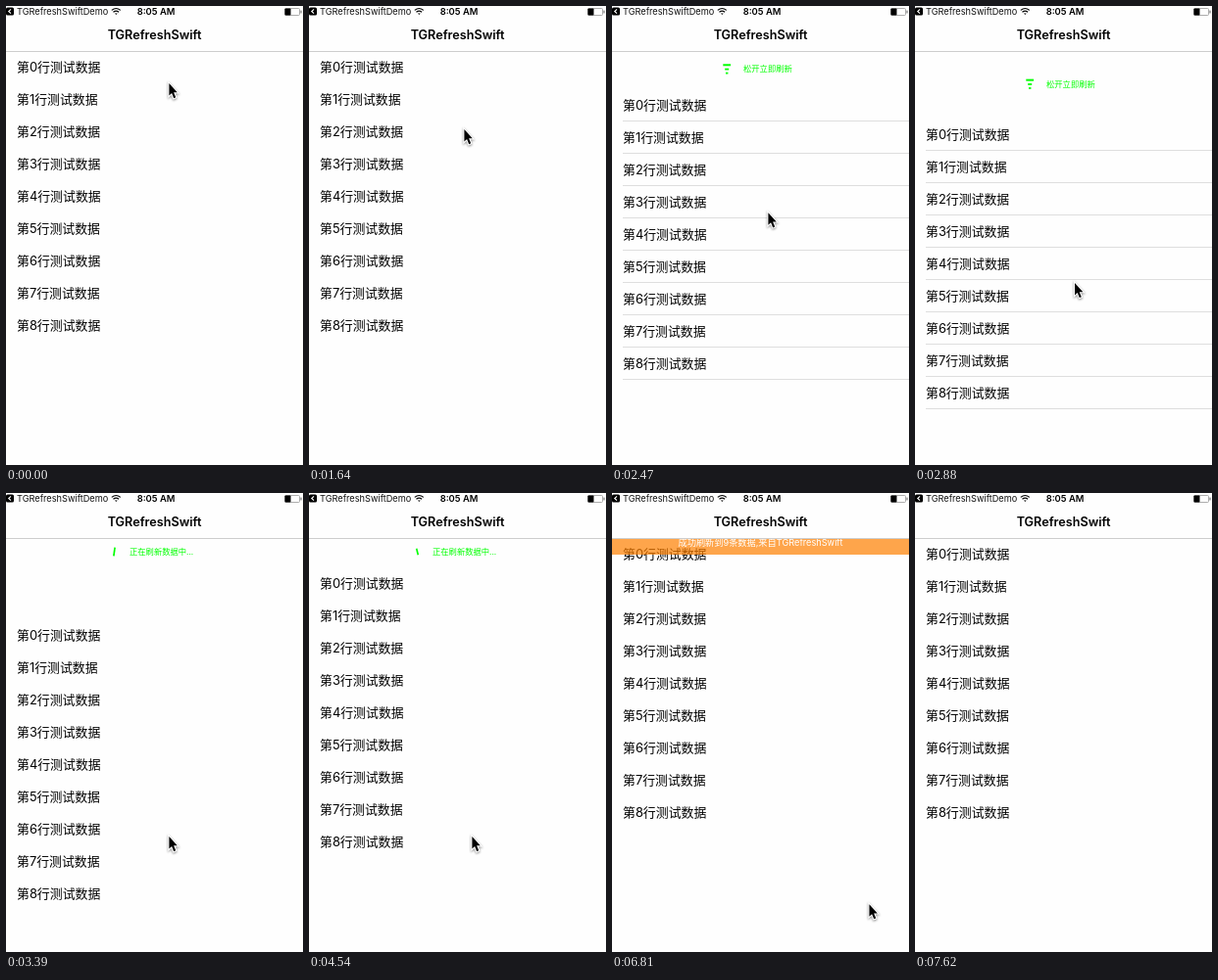
Animation, 303 px wide and 469 px high, one loop 8730 ms. Source, as an HTML page:

```html
<!DOCTYPE html>
<html>
<head>
<meta charset="utf-8">
<title>Pull to refresh</title>
<style>
html, body { margin: 0; width: 100%; height: 100%; overflow: hidden; background: #fefefe; }
svg { display: block; width: 303px; height: 469px; }
text { font-family: Inter, "Noto Sans CJK SC", "Noto Sans CJK", sans-serif; white-space: pre; }
.row { font-size: 12.9px; fill: #000; }
.tip { font-size: 8.3px; fill: #0f0; }
</style>
</head>
<body>
<svg viewBox="0 0 303 469">
  <rect width="303" height="469" fill="#fefefe"/>
  <g id="list"></g>
  <g id="head">
    <g id="funnel" fill="#0f0">
      <rect x="113.3" y="-5" width="7.8" height="2"/>
      <rect x="115.2" y="-.6" width="4" height="1.8"/>
      <rect x="116" y="3.4" width="2.4" height="1.8"/>
    </g>
    <path id="spin" d="M0-4.4V4.4" stroke="#0f0" stroke-width="1.7"/>
    <text id="tip" class="tip" y="3"></text>
  </g>
  <g id="banner">
    <rect width="303" height="26" fill="#ff8000" opacity=".7"/>
    <text x="151.5" y="16.8" text-anchor="middle" font-size="9.2" fill="#fff">成功刷新到9条数据,来自TGRefreshSwift</text>
  </g>
  <rect width="303" height="46" fill="#fefefe"/>
  <rect y="46" width="303" height="1" fill="#cdcdcd"/>
  <rect y="1.5" width="8" height="8" rx="1.6"/>
  <path d="M5 3.3L2.7 5.5L5 7.7" fill="none" stroke="#fff" stroke-width="1.1"/>
  <text x="11" y="8.6" font-size="9.2" fill="#111">TGRefreshSwiftDemo</text>
  <g fill="none" stroke="#000" stroke-width="1.2">
    <path d="M107.8 4.4Q112.3 .6 116.8 4.4M109.5 6.3Q112.3 4 115.1 6.3"/>
    <path d="M111 7.4H113.6L112.3 8.9Z" fill="#000" stroke="none"/>
  </g>
  <text x="153" y="9" font-size="9.4" font-weight="600" text-anchor="middle">8:05 AM</text>
  <rect x="284.5" y="2.5" width="15" height="7" rx="1" fill="none" stroke="#999" stroke-width=".8"/>
  <rect x="284.5" y="2.5" width="6" height="7" rx=".8"/>
  <rect x="300.4" y="4.6" width="1.2" height="2.8" fill="#777"/>
  <text x="151.6" y="34" font-size="12.65" font-weight="600" text-anchor="middle">TGRefreshSwift</text>
  <path id="cursor" d="M.4 0V12.6L3.1 10L5.2 15.2L7.2 14.3L5.1 9.3H8.8Z" stroke="#fff" stroke-width="2.2"
    paint-order="stroke" style="filter:drop-shadow(0 1px .8px rgba(0,0,0,.45))"/>
</svg>
<script>
const LOOP = 8730, START = 1660, RELEASE = 3270, DONE = 5710;
const $ = id => document.getElementById(id);
const show = (el, on) => el.setAttribute('display', on ? 'inline' : 'none');
const move = (el, x, y, more = '') => el.setAttribute('transform', `translate(${x} ${y})${more}`);
const clamp = v => Math.min(1, Math.max(0, v));
const easeOut = p => 1 - (1 - p) ** 2;

// Each key is [time, ...values]; values are interpolated linearly.
function track(keys, t) {
  let i = 0;
  while (i < keys.length - 2 && t >= keys[i + 1][0]) i++;
  const a = keys[i], b = keys[i + 1];
  const p = clamp((t - a[0]) / (b[0] - a[0]));
  return a.slice(1).map((v, k) => v + (b[k + 1] - v) * p);
}

const pointer = [
  [0, 166, 79], [330, 166, 79], [360, 166, 80], [560, 166, 80], [1000, 157.5, 139], [1160, 158, 126],
  [START, 158, 126], [2470, 159, 211], [RELEASE, 166, 351], [5740, 166, 351],
  [6630, 214, 365], [6810, 262, 420], [7150, 284, 472]
];
const bannerTop = [[5740, 20], [6100, 46], [6330, 46], [6810, 37], [7620, 20]];

let rows = '', lines = '';
for (let i = 0; i < 9; i++) {
  rows += `<text class="row" x="11" y="${67 + 33 * i}">第${i}行测试数据</text>`;
  lines += `<rect x="11" y="${78 + 33 * i}" width="292" height="1" fill="#dedede"/>`;
}
$('list').innerHTML = rows + `<g id="lines">${lines}</g>`;

function pull(t, y) {
  if (t < START) return 0;
  if (t < RELEASE) {
    const d = (y - 126) * .4675;
    return d / (1 + d / 1250);
  }
  if (t < DONE) {
    const bounce = 97 - 14 * clamp((t - RELEASE) / 110);
    return bounce - 53 * easeOut(clamp((t - 3440) / 300));
  }
  return 30 * (1 - easeOut(clamp((t - DONE) / 350)));
}

function draw(t) {
  const [x, y] = track(pointer, t);
  const off = pull(t, y), busy = t >= RELEASE;

  move($('cursor'), x, y);
  show($('cursor'), t < 7150);

  // Hairlines only show at half-pixel scroll positions.
  move($('list'), 0, Math.round(off - .01));
  show($('lines'), Math.round(off * 2) % 2 === 1);

  show($('head'), t >= START && t < DONE);
  move($('head'), 0, busy ? 60 : 45 + off / 2);
  show($('funnel'), !busy);
  show($('spin'), busy);
  $('tip').textContent = busy ? '正在刷新数据中...' : off > 32 ? '松开立即刷新' : '下拉可以刷新';
  $('tip').setAttribute('x', busy ? 126 : 134);

  const swing = Math.sin(Math.PI * clamp(((t - 3420 + 920) % 463) / 300));
  move($('spin'), 110.5, 0, ` rotate(${8 - 24 * swing}) scale(1 ${1 - .25 * swing})`);

  show($('banner'), t >= 5740 && t < 7620);
  move($('banner'), 0, track(bannerTop, t)[0]);
}

const begin = performance.now();
function tick() {
  draw((performance.now() - begin) % LOOP);
  requestAnimationFrame(tick);
}
tick();
</script>
</body>
</html>
```
